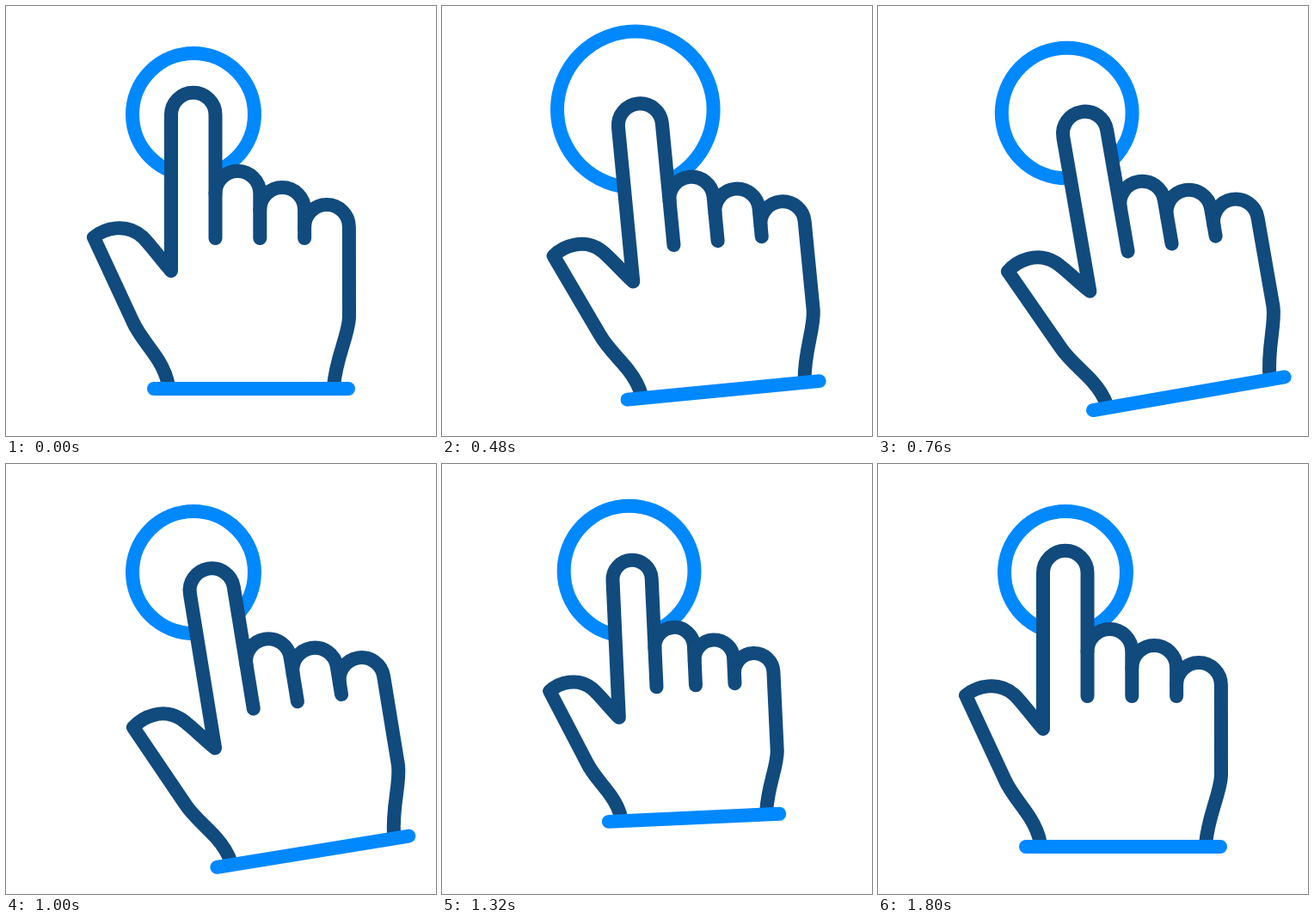
Write an HTML page with a canvas that moves like this. It is 500 px wide and 500 px high and loops after 2 s.

```html
<!DOCTYPE html>
<html lang="en">
<head>
<meta charset="utf-8">
<title>Tap gesture</title>
<style>
  html, body { margin: 0; width: 100%; height: 100%; overflow: hidden; background: #fff; }
  canvas { display: block; width: 500px; height: 500px; }
</style>
</head>
<body>
<canvas id="stage" width="500" height="500"></canvas>
<script>
const ctx = document.getElementById('stage').getContext('2d');
const LOOP = 2000, STEP = 40;
const BLUE = '#0088ff', NAVY = '#114a7d';
const TIP = { x: 217.75, y: 126.5 };
const PRESS = { x: 194, y: 142 };
const KNUCKLES = [[243.5, 218], [295.3, 237], [347.1, 257]];
const R = 25.9;

const clamp = v => Math.min(1, Math.max(0, v));
const smooth = x => x * x * (3 - 2 * x);

// Symmetric cubic-bezier(a, 0, 1 - a, 1), solved by bisection.
function ease(x, a) {
  let lo = 0, hi = 1;
  for (let i = 0; i < 24; i++) {
    const u = (lo + hi) / 2, v = 1 - u;
    const bx = 3 * v * v * u * a + 3 * v * u * u * (1 - a) + u * u * u;
    if (bx < x) lo = u; else hi = u;
  }
  return smooth(lo);
}

// Rises from 0 to 1 and falls back, centred on mid.
const rise = (t, mid, half) => clamp(1 - Math.abs(t - mid) / half);
const pulse = (t, mid, half) => smooth(rise(t, mid, half));

function handMatrix(t) {
  const turn = ease(rise(t, 840, 760), 0.48);
  const s = 1 - 0.151 * (pulse(t, 300, 210) + pulse(t, 1380, 210));
  return new DOMMatrix()
    .translate(TIP.x + 23.4 * turn, TIP.y + 22.3 * turn)
    .rotate(-10 * turn)
    .translate(PRESS.x - TIP.x, PRESS.y - TIP.y)
    .scale(s)
    .translate(-PRESS.x, -PRESS.y);
}

function outline() {
  const p = new Path2D();
  p.moveTo(189, 442);
  p.bezierCurveTo(187, 430, 183.5, 422, 176.5, 411);
  p.bezierCurveTo(167, 396, 154, 382, 147.5, 367);
  p.lineTo(102, 269);
  p.bezierCurveTo(115, 258, 140, 252, 158, 268);
  p.bezierCurveTo(166, 275, 178, 292, 192, 308);
  p.lineTo(192, TIP.y);
  p.arc(TIP.x, TIP.y, 25.75, Math.PI, 0);
  for (const [x, y] of KNUCKLES) {
    p.lineTo(x, y);
    p.arc(x + R, y, R, Math.PI, 0);
  }
  p.lineTo(399, 362);
  p.bezierCurveTo(398, 384, 384, 408, 381, 442);
  return p;
}

function creases() {
  const p = new Path2D();
  for (const [x, y] of KNUCKLES) {
    p.moveTo(x, y);
    p.lineTo(x, 270);
  }
  return p;
}

function cuff() {
  const p = new Path2D();
  p.moveTo(172, 445);
  p.lineTo(398, 445);
  return p;
}

const OUTLINE = outline(), CREASES = creases(), CUFF = cuff();

function stroke(path, color) {
  ctx.strokeStyle = color;
  ctx.stroke(path);
}

function drawRing(t) {
  const a = pulse(t, 560, 280), b = pulse(t, 1520, 280);
  const ring = new Path2D();
  ring.arc(218 + 8.5 * a - 2 * b, 126 - 7 * a - 7 * b, 71 + 24.7 * (a + b), 0, 2 * Math.PI);
  stroke(ring, BLUE);
}

// Paths are transformed before stroking so the line weight stays constant.
function drawHand(t) {
  const m = handMatrix(t);
  const place = path => {
    const p = new Path2D();
    p.addPath(path, m);
    return p;
  };
  const body = place(OUTLINE);
  ctx.fillStyle = '#fff';
  ctx.fill(body);
  stroke(body, NAVY);
  stroke(place(CREASES), NAVY);
  stroke(place(CUFF), BLUE);
}

function frame() {
  const t = Math.floor((performance.now() % LOOP) / STEP) * STEP;
  ctx.fillStyle = '#fff';
  ctx.fillRect(0, 0, 500, 500);
  ctx.lineWidth = 16;
  ctx.lineCap = ctx.lineJoin = 'round';
  drawRing(t);
  drawHand(t);
  requestAnimationFrame(frame);
}
frame();
</script>
</body>
</html>
```
